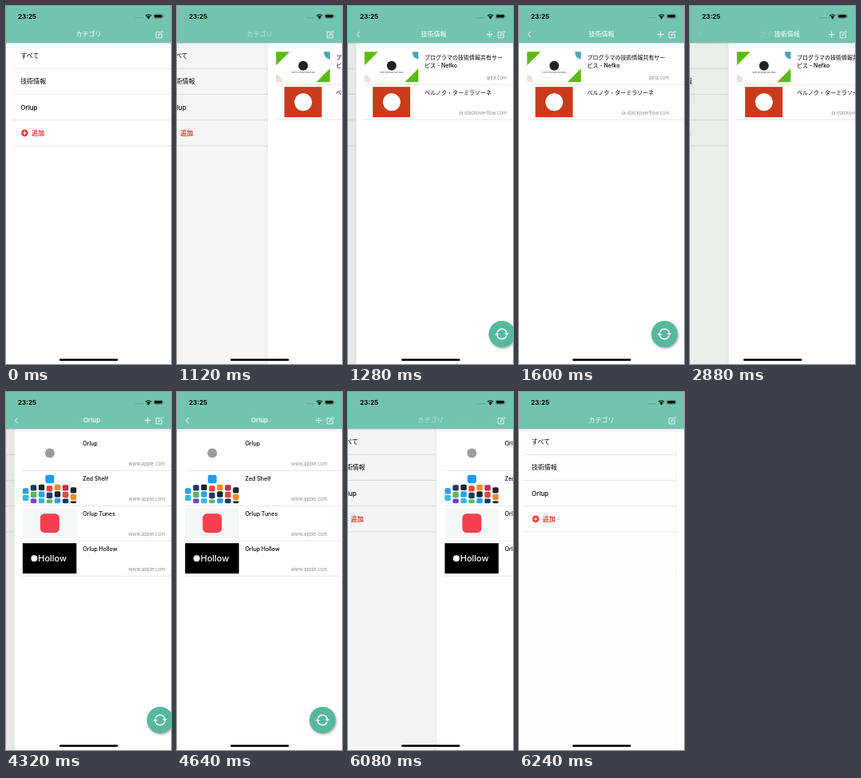
These frames come from a looping animation (207 px wide and 448 px high, 6400 ms). An HTML page:

```html
<!DOCTYPE html>
<html lang="ja">
<head>
<meta charset="utf-8">
<style>
html, body { margin: 0; width: 100%; height: 100%; overflow: hidden; background: #fff; }
svg { display: block; width: 100%; height: 100%; }
text { font-family: Inter, "Noto Sans CJK JP", "Noto Sans CJK", sans-serif; font-weight: 500; white-space: pre; }
.line { stroke: #dcdcdc; stroke-width: .7; }
.icon { fill: none; stroke: #fff; stroke-linecap: round; stroke-linejoin: round; }
</style>
</head>
<body>
<svg id="stage" viewBox="0 0 207 448">
  <defs>
    <linearGradient id="edge">
      <stop offset="0" stop-color="#000" stop-opacity="0"/>
      <stop offset="1" stop-color="#000" stop-opacity=".025"/>
    </linearGradient>
    <filter id="blur" x="-30%" y="-30%" width="160%" height="160%"><feGaussianBlur stdDeviation="1.5"/></filter>
  </defs>
  <rect width="207" height="448" fill="#fff"/>
  <g id="list"></g>
  <rect id="dim" y="46" width="207" height="402" fill="#0a1a08"/>
  <g id="page">
    <rect x="-5" y="46" width="5" height="402" fill="url(#edge)"/>
    <rect y="46" width="207" height="402" fill="#fff"/>
    <g id="tech"></g>
    <g id="brand"></g>
    <circle cx="183.5" cy="412" r="16.5" opacity=".35" filter="url(#blur)"/>
    <circle cx="182.5" cy="410.5" r="16.5" fill="#58b89d"/>
    <g class="icon" stroke-width="1.4">
      <path d="M177.1 407.4A6.2 6.2 0 0 1 188.6 409.4M187.9 413.6A6.2 6.2 0 0 1 176.4 411.6"/>
      <path d="M186.4 409.6h4.6l-2.3 2.6zM178.6 411.4h-4.6l2.3-2.6z" fill="#fff" stroke-width=".4"/>
    </g>
  </g>
  <rect width="207" height="46" fill="#72c4ad"/>
  <rect y="46" width="207" height=".5" opacity=".3"/>
  <text x="15" y="15.7" font-size="8" style="font-weight:700">23:25</text>
  <path d="M162.5 14.7h10" stroke="#4d917e" stroke-dasharray="1.6 1.1"/>
  <g fill="none" stroke="#000" stroke-width="1.3">
    <path d="M175.2 12.3a5 5 0 0 1 7 0M176.7 13.9a3 3 0 0 1 4 0"/>
    <circle cx="178.7" cy="15.2" r=".5"/>
    <rect x="185.4" y="10.2" width="11.2" height="5.2" rx="1.5" stroke-width=".5" opacity=".4"/>
    <path d="M197.8 12v1.8" stroke-width=".8" opacity=".4"/>
  </g>
  <rect x="186.2" y="11" width="9.6" height="3.6" rx=".8"/>
  <text id="rootTitle" x="103.5" y="38.4" font-size="8" fill="#fff" text-anchor="middle">カテゴリ</text>
  <text id="pageTitle" x="103.5" y="38.4" font-size="8" fill="#fff" text-anchor="middle"></text>
  <path id="back" class="icon" d="M14.4 32.3l-3 3.3 3 3.3"/>
  <path id="plus" class="icon" d="M174.3 35.6h6.8M177.7 32.2v6.8"/>
  <path class="icon" stroke-width=".8" d="M192.5 32.6h-4.3v7.2h7.2v-4.3M191 37l.5-1.9 4-4 1.3 1.3-4 4z"/>
  <rect x="67" y="441.5" width="73.5" height="2.5" rx="1.25"/>
</svg>
<script>
const $ = id => document.getElementById(id);
const rect = (x, y, w, h, fill, rx = 0) =>
  `<rect x="${x}" y="${y}" width="${w}" height="${h}" fill="${fill}" rx="${rx}"/>`;
const circle = (x, y, r, fill) => `<circle cx="${x}" cy="${y}" r="${r}" fill="${fill}"/>`;
const shape = (d, fill) => `<path d="${d}" fill="${fill}"/>`;
const label = (x, y, size, str, extra = '') =>
  `<text x="${x}" y="${y}" font-size="${size}" ${extra}>${str}</text>`;
const line = (x, y) => `<path class="line" d="M${x} ${y}H207"/>`;

const names = ['すべて', '技術情報', 'Orlup'];
const red = '#ed3d35';
$('list').innerHTML =
  names.map((s, i) => label(18.3, 65.2 + i * 32.2, 8, s)).join('') +
  [0, 1, 2, 3].map(i => line(8, 78.3 + i * 32.2)).join('') +
  circle(23.4, 159, 4.4, red) +
  '<path class="icon" d="M21.4 159h4M23.4 157v4"/>' +
  label(32.2, 161.9, 8, '追加', `fill="${red}" style="font-weight:700"`);

// Each row: thumbnail, title lines, address
const row = ([art, title, url], i) => {
  const y = 54 + i * 44;
  return `<g transform="translate(10.2 ${y + 3.2})">${art}</g>` +
    title.split('\n').map((s, k) => label(85.5, y + 12.6 + k * 10, 7, s)).join('') +
    label(188.8, y + 37.6, 6, url, 'text-anchor="end" fill="#8e8e93" style="font-weight:400"') +
    line(10, y + 44.3);
};

const corners =
  shape('M0 0H17L0 17z', '#5bbb0b') + shape('M67.5 21V38H50.5z', '#5bbb0b') +
  shape('M60 0H67.5V9.5Q60 8 60 0z', '#4aa3b8') + shape('M0 28.5Q7.5 30 7.5 38H0z', '#f0ddd6') +
  circle(34, 17.5, 6, '#222') +
  label(34, 26.8, 2.3, 'notes for people who build', 'text-anchor="middle" fill="#555"');

const hues = ['#20232b', '#e8453c', '#2b9fe8', '#7a3fd0', '#f08a24', '#173a66', '#35b8e0', '#c22b4f', '#222', '#58b85a'];
const tops = [19, 15, 14.5, 16, 14.5, 15, 18];
const apps = tops.map((y, c) => [0, 1, 2].map(r => {
  const top = y + r * 8.6;
  return top > 36 ? '' : rect(c * 10, top, 7.4, Math.min(7.4, 38 - top), hues[(c * 3 + r * 4 + 2) % 10], 1.7);
}).join('')).join('') + rect(28.5, 2.5, 11, 10.5, '#1c9cf0', 2.4);

$('tech').innerHTML = [
  [corners, 'プログラマの技術情報共有サー\nビス - Nefko', 'qiita.com'],
  [rect(10.3, 0, 47, 38, '#cb3a1c') + circle(34, 19, 11, '#fff'), 'ベルノク・ターミラソーネ', 'ja.stackoverflow.com']
].map(row).join('');

$('brand').innerHTML = [
  [circle(34, 19.2, 6, '#9c9c9e'), 'Orlup'],
  [apps, 'Zed Shelf'],
  [rect(0, 0, 67.5, 38, '#f5f7f7') + rect(22, 7, 24, 24, '#f6404f', 5.5), 'Orlup Tunes'],
  [rect(0, 0, 67.5, 38, '#000') + circle(14.5, 19, 4, '#fff') +
    label(19.3, 22.7, 11, 'Hollow', 'fill="#fff"'), 'Orlup Hollow']
].map(([art, title], i) => row([art, title, 'www.apple.com'], i)).join('');

// [start in ms, 1 = open the page, 0 = go back]
const moves = [[1044, 1], [2834, 0], [4085, 1], [5990, 0]];
const LOOP = 6400, STEP = 160, RATE = .02, SETTLE = 500;
const clamp = v => Math.max(0, Math.min(1, v));

function openness(t) {
  const move = moves.filter(m => m[0] <= t).pop();
  if (!move) return 0;
  const age = t - move[0], x = age * RATE;
  const eased = age > SETTLE ? 1 : 1 - (1 + x) * Math.exp(-x);
  return move[1] ? eased : 1 - eased;
}

function draw(now) {
  const t = Math.floor(now % LOOP / STEP) * STEP;   // the screen refreshes in steps
  const q = openness(t), first = t < 3680;
  const shift = (id, x) => $(id).setAttribute('transform', `translate(${x} 0)`);
  const fade = (id, a) => $(id).setAttribute('opacity', clamp(a));
  shift('list', -62 * q);
  shift('page', 207 * (1 - q));
  shift('pageTitle', 78 * (1 - q));
  fade('dim', .1 * q);
  fade('page', q > 0 ? 1 : 0);
  fade('rootTitle', 1 - q);
  fade('pageTitle', (q - .45) * 3);
  fade('plus', (q - .45) * 3);
  fade('back', (q - .7) * 3.4);
  fade('tech', first ? 1 : 0);
  fade('brand', first ? 0 : 1);
  $('pageTitle').textContent = names[first ? 1 : 2];
}

const begin = performance.now();
(function tick() {
  draw(performance.now() - begin);
  requestAnimationFrame(tick);
})();
</script>
</body>
</html>
```
